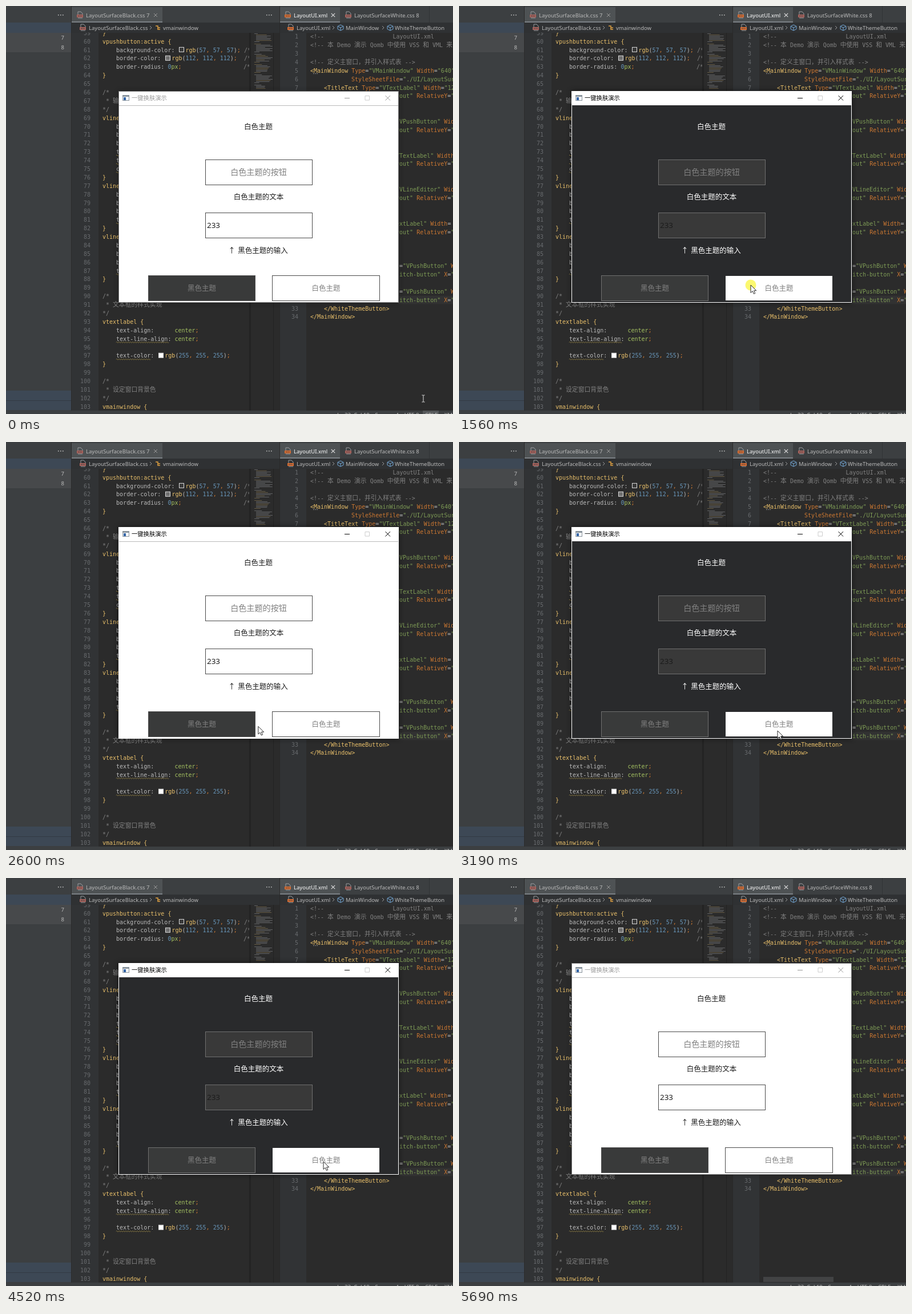
These frames come from a looping animation (783x715 px, 5740 ms). An HTML page:

```html
<!DOCTYPE html>
<html lang="zh">
<head>
<meta charset="utf-8">
<style>
html, body { margin: 0; width: 100%; height: 100%; overflow: hidden; background: #2b2b2b; }
svg { display: block; }
text { white-space: pre; }
.code { font: 10px "DejaVu Sans Mono", "Noto Sans CJK SC", "Noto Sans CJK", monospace; fill: #bababa; }
.ui { font: 9.5px "Noto Sans", "Open Sans", sans-serif; fill: #bbbbbb; }
.cjk { font-family: "Noto Sans CJK SC", "Noto Sans CJK", sans-serif; text-anchor: middle; }
</style>
</head>
<body>
<svg id="stage" width="783" height="715" viewBox="0 0 783 715"></svg>
<script>
const stage = document.getElementById('stage');
const LOOP = 5740, PITCH = 14.885;

const rect = (x, y, w, h, fill, more = '') =>
  `<rect x="${x}" y="${y}" width="${w}" height="${h}" fill="${fill}" ${more}/>`;
const path = (d, stroke, more = '') => `<path d="${d}" fill="none" stroke="${stroke}" ${more}/>`;
const text = (x, y, s, cls, more = '') => `<text x="${x}" y="${y}" class="${cls}" ${more}>${s}</text>`;
const esc = s => s.replace(/&/g, '&amp;').replace(/</g, '&lt;').replace(/>/g, '&gt;');
const ink = (s, color, more = '') => `<tspan fill="${color}" ${more}>${esc(s)}</tspan>`;
const enlargeCjk = s => s.replace(/[\u2e80-\u9fff\uff00-\uffef]+/g, m => `<tspan font-size="10.8">${m}</tspan>`);

// Syntax colouring: each capture group of the pattern has its colour.
function paint(line, pattern, colors) {
  let out = '', end = 0;
  for (const m of line.matchAll(pattern)) {
    out += esc(line.slice(end, m.index));
    const group = m.slice(1).findIndex(g => g !== undefined);
    const swatch = m[0][0] === '@';
    out += ink(swatch ? m[0].slice(1) : m[0], colors[group], swatch ? 'dx="13"' : '');
    end = m.index + m[0].length;
  }
  return out + esc(line.slice(end));
}
const css = s => /^( \*|\/\*|\*\/)/.test(s) ? enlargeCjk(ink(s, '#808080')) :
  paint(s, /(\/\*)|(@rgb|^v[\w:]+|[{}])|(\d+)|(center|px)|([;,])/g,
    ['#808080', '#e8bf6a', '#6897bb', '#a5c261', '#cc7832']);
const xml = s => s.startsWith('<!--') ? enlargeCjk(ink(s, '#808080')) :
  paint(s, /(^[\w-]+"|"[^"]*"?)|(<\/?\w+|>)|(\w+(?==))/g, ['#7d9a55', '#e8bf6a', '#cc7832']);

const leftY = n => 62 + (n - 60) * PITCH;
const rightY = n => 53.5 + (n - 1) * PITCH;

const cssLines = {
  59: '}', 60: 'vpushbutton:active {',
  61: '    background-color: @rgb(57, 57, 57); /*',
  62: '    border-color: @rgb(112, 112, 112);  /*',
  63: '    border-radius: 0px;                  /*',
  64: '}', 66: '/*', 67: ' * 输入框', 68: '*/', 69: 'vlineeditor {',
  76: '}', 77: 'vlineeditor {', 82: '}', 83: 'vlineeditor {', 88: '}',
  90: '/*', 91: ' * 文本框的样式实现', 92: '*/', 93: 'vtextlabel {',
  94: '    text-align:      center;', 95: '    text-line-align: center;',
  97: '    text-color: @rgb(255, 255, 255);', 98: '}',
  100: '/*', 101: ' * 设定窗口背景色', 102: '*/', 103: 'vmainwindow {'
};
[[70, 'bbbttc'], [78, 'bbbt'], [84, 'bbbt']].forEach(([n, initials]) =>
  [...initials].forEach((c, i) => { cssLines[n + i] = '    ' + c; }));

const layout = 'yout" RelativeY="', push = '"VPushButton" Width=';
const xmlLines = [
  [1, 533, '<!--' + ' '.repeat(20) + 'LayoutUI.xml'],
  [2, 533, '<!-- 本 Demo 演示 Qomb 中使用 VSS 和 VML 来'],
  [4, 533, '<!-- 定义主窗口，并引入样式表 -->'],
  [5, 533, '<MainWindow Type="VMainWindow" Width="640"'],
  [6, 605, 'StyleSheetFile="./UI/LayoutSurface'],
  [7, 557, '<TitleText Type="VTextLabel" Width="12'],
  [11, 683, push], [15, 677, '"VTextLabel" Width='],
  [19, 683, '"VLineEditor" Width='], [23, 665, '"VTextLabel" Width='],
  ...[8, 12, 16, 20, 24].map(n => [n, 683, layout]),
  [28, 689, '=' + push], [29, 689, 'itch-button" X="6'],
  [31, 689, '=' + push], [32, 689, 'itch-button" X="3'],
  [33, 557, '</WhiteThemeButton>'], [34, 533, '</MainWindow>']
];

const wave = (n, chars) => {
  let d = `M193 ${leftY(n) + 6.5}`;
  for (let i = 0; i < chars * 1.5; i++) d += 'q1-2 2 0t2 0';
  return path(d, '#a8924a', 'stroke-width=".8"');
};
const fileIcon = (x, y, color) =>
  path(`M${x + 2} ${y + 5}v-5h5l3 3v2`, '#9a9da0') + rect(x, y + 5, 11, 5, color) +
  path(`M${x + 2} ${y + 7.5}h7`, '#3c3f41', 'stroke-dasharray="2 .7"') +
  path(`M${x + 2} ${y + 11}h8`, '#9a9da0');
const dots = (x, y) => [0, 4, 8].map(d => rect(x + d, y, 1.6, 1.6, '#bbb')).join('');
const cross = (x, y, r, color, w = 1) =>
  path(`M${x - r} ${y - r}l${2 * r} ${2 * r}m0 ${-2 * r}l${-2 * r} ${2 * r}`, color, `stroke-width="${w}"`);
const chevron = x => path(`M${x} 35l3 3-3 3`, '#9a9a9a');
const cube = x => path(`M${x} 35.5l5-2.5 5 2.5v5l-5 2.5-5-2.5zl5 2.5 5-2.5m-5 2.5v5`, '#75a9d8');

function minimap() {
  let seed = 7, out = '';
  const rnd = () => (seed = seed * 16807 % 2147483647) / 2147483647;
  for (let y = 48; y < 146; y += 2) {
    const row = (y - 48) / 2 % 9;
    if (row === 8) continue;
    const edge = row === 0 || row === 7;
    out += rect(edge ? 435 : 438, y, edge ? 6 + rnd() * 8 : 14 + rnd() * 16, 1,
      rnd() < .3 ? '#8a7a55' : '#85888a', 'opacity=".6"');
  }
  return out;
}

function editor() {
  let s = rect(0, 0, 783, 715, '#2b2b2b') +
    rect(115, 30, 47, 680, '#313335') + rect(480, 30, 46, 680, '#313335');
  s += rect(687, rightY(32) - 7, 96, 14.5, '#323232');
  for (let n = 59; n <= 103; n++) {
    s += text(148, leftY(n) + 3.7, n, 'code', 'text-anchor="end" style="fill:#686b6e"');
    if (cssLines[n]) s += text(169, leftY(n) + 3.7, css(cssLines[n]), 'code');
  }
  for (let n = 1; n <= 34; n++)
    s += text(512, rightY(n) + 3.7, n, 'code', 'text-anchor="end" style="fill:#686b6e"');
  for (const [n, x, line] of xmlLines) s += text(x, rightY(n) + 3.7, xml(line), 'code');
  for (const [n, col, color] of [[61, 22, '#393939'], [62, 18, '#707070'], [97, 16, '#fff']])
    s += rect(171.5 + col * 6, leftY(n) - 4.5, 8, 8, color, 'stroke="#ddd"');
  for (const [n, len] of [[73, 1], [74, 1], [75, 1], [81, 1], [87, 1], [95, 15], [97, 10]]) s += wave(n, len);
  s += path('M538 118.5h8', '#aaa', 'stroke-dasharray="1.5 1.7"');
  s += rect(426, 47, 3, 662, '#232323') + rect(468, 47, 1, 662, '#222') + rect(479, 0, 1, 709, '#292929') + minimap();

  // Breadcrumbs and tabs
  s += rect(115, 29, 364, 18, '#2f3133') + rect(480, 29, 303, 18, '#2f3133') +
    fileIcon(129, 32, '#a6615b') + text(145, 41.5, 'LayoutSurfaceBlack.css', 'ui') + chevron(252) +
    path('M262 35h4v6h4m-4-3h4', '#e0a042', 'stroke-width="1.5"') + text(275, 41.5, 'vmainwindow', 'ui') +
    fileIcon(493, 32, '#d46b32') + text(509, 41.5, 'LayoutUI.xml', 'ui') + chevron(572) +
    cube(581) + text(595, 41.5, 'MainWindow', 'ui') + chevron(659) + cube(668) + text(681, 41.5, 'WhiteThemeButton', 'ui');
  s += rect(0, 0, 783, 29, '#3c3f41') + rect(115, 2, 159, 27, '#4e5254') + rect(480, 2, 105, 27, '#4e5254') +
    rect(115, 27, 159, 2, '#7b8085') + rect(480, 27, 105, 2, '#7b8085') +
    fileIcon(124, 10, '#a6615b') + text(140, 19.5, 'LayoutSurfaceBlack.css 7', 'ui') + cross(262, 16, 3, '#999') +
    fileIcon(488, 10, '#d46b32') + text(504, 19.5, 'LayoutUI.xml', 'ui', 'style="fill:#fff"') + cross(573, 16, 3.2, '#ddd', 1.2) +
    fileIcon(594, 10, '#a6615b') + text(610, 19.5, 'LayoutSurfaceWhite.css 8', 'ui') +
    rect(479, 0, 1, 29, '#2b2b2b') + rect(741, 0, 1, 29, '#313335') + dots(456, 15);

  // Sidebar and status bar
  s += rect(0, 0, 114, 715, '#3c3f41') + rect(114, 0, 1, 709, '#2b2b2b') + rect(0, 29, 114, 18, '#3d4855') +
    rect(0, 47, 114, 34, '#47494b') + rect(0, 674, 114, 34, '#3d4855') + rect(0, 691, 114, 1, '#323a44') + dots(91, 15) +
    text(102, 59, '7', 'ui', 'text-anchor="end"') + text(102, 76, '8', 'ui', 'text-anchor="end"');
  s += rect(533, 699, 123, 9, '#424344', 'id="scroll"') + rect(0, 709, 783, 6, '#3c3f41') +
    rect(730, 709, 28, 6, '#55585a', 'id="statusHover"') +
    text(580, 720, 'Ln 33, Col 18    Spaces: 4    UTF-8', 'ui') + text(734, 720, 'CRLF', 'ui') + text(768, 720, 'XML', 'ui');
  return s;
}

const box = (x, y, cls, w = 187) => rect(x + .5, y + .5, w, 44, 'none', `class="${cls}"`);
const label = (x, y, size, s, cls) => text(x, y, s, 'cjk ' + cls, `font-size="${size}"`);

function dialog() {
  return rect(197, 149, 491, 371, '#000', 'id="shadow" filter="url(#blur)"') +
    rect(197.5, 149.5, 490, 370, '#fff', 'id="frame"') +
    rect(198, 174, 489, 345, '#fff', 'id="client"') +
    path('M198 174.5h489', '#bbb', 'id="edge"') +
    rect(204.5, 156.5, 11, 9, '#f4f6f8', 'stroke="#8a949c"') + rect(205, 157, 10, 2, '#8a949c') + rect(206, 160, 4, 5, '#3566a8') +
    text(220, 165, '一键换肤演示', 'cjk title', 'font-size="10.3" style="text-anchor:start"') +
    path('M593 161.5h9', '#000', 'class="glyph"') +
    path('M629 157.5h7.5v7.5h-7.5z', '#ccc') +
    `<g class="glyph">${path('M664.5 157l8.5 8.5m0-8.5l-8.5 8.5', 'inherit')}</g>` +
    label(442, 215.5, 12.5, '白色主题', 'label') +
    box(349, 269, 'field') + label(442.5, 296, 14.1, '白色主题的按钮', 'btn') +
    label(442.5, 339, 12.5, '白色主题的文本', 'label') +
    box(349, 362, 'field') +
    text(352, 388.5, '233', '', 'font-size="13.4" font-family="Noto Sans, sans-serif" fill="#1c1c1c"') +
    label(395.5, 432.5, 12.5, '↑', 'label') + label(450, 432.5, 12.5, '黑色主题的输入', 'label') +
    box(249, 472, 'black') + label(343, 498.5, 12.5, '黑色主题', 'btn') +
    box(466, 472, 'white', 188) + label(560.5, 498.5, 12.5, '白色主题', 'btn');
}

stage.innerHTML =
  '<defs><filter id="blur" x="-10%" y="-10%" width="120%" height="120%"><feGaussianBlur stdDeviation="5"/></filter></defs>' +
  editor() + dialog() +
  '<circle id="halo" r="9.5" fill="#fbf870"/>' +
  '<path id="arrow" d="M0 0v13.5l3.2-2.8 2.2 4.8 2.3-1-2.1-4.7h4.2z" fill="#fff" stroke="#111" stroke-width=".9"/>' +
  path('M-2.5-6h2l.5.5.5-.5h2M0-5.5v11M-2.5 6h2l.5-.5.5.5h2', '#e4e4e4', 'id="beam"');

const $ = id => document.getElementById(id);
const attr = (sel, values) => stage.querySelectorAll(sel).forEach(el => {
  for (const k in values) el.setAttribute(k, values[k]);
});
const show = (id, on) => $(id).setAttribute('visibility', on ? 'visible' : 'hidden');

// Pointer stops: arrive, leave, x, y. A press always ends with a theme switch.
const stops = [
  [0, 30, 731, 688], [340, 430, 362, 494], [610, 820, 487, 490], [1090, 1170, 384, 493],
  [1540, 1650, 511, 489], [1890, 2030, 387, 494], [2340, 2420, 538, 499], [2730, 2810, 384, 498],
  [3120, 3280, 558, 506], [3510, 3580, 382, 500], [3750, 3820, 550, 501], [4140, 4210, 384, 499],
  [4510, 4580, 556, 497], [4780, 4840, 392, 497], [4925, 4975, 500, 497], [5310, LOOP, 693, 676]
];
// Press and release times, alternating black and white.
const clicks = [
  [380, 420], [610, 650], [1100, 1160], [1560, 1650], [1900, 2000], [2350, 2410], [2740, 2800],
  [3220, 3270], [3520, 3570], [3760, 3810], [4150, 4200], [4530, 4570], [4785, 4830], [4930, 4970]
];

function pointer(t) {
  const i = stops.findIndex(s => t < s[1]);
  const [arrive, , x, y] = stops[i];
  if (t >= arrive) return [x, y];
  const [, leave, px, py] = stops[i - 1];
  const u = (t - leave) / (arrive - leave), e = u * u * (3 - 2 * u);
  return [px + (x - px) * e, py + (y - py) * e];
}

function theme(dark, active) {
  const back = dark ? '#292a2c' : '#fff';
  attr('#client', { fill: back });
  attr('#edge', { stroke: dark ? back : '#bbb' });
  attr('.label', { fill: dark ? '#fff' : '#1c1c1c' });
  attr('.btn', { fill: '#808080' });
  attr('.field', { fill: dark ? '#393939' : '#fff', stroke: dark ? '#707070' : '#4a4a4a' });
  attr('.black', { fill: '#393a3a', stroke: dark ? '#707070' : '#505050' });
  attr('.white', { fill: '#fff', stroke: dark ? back : '#4a4a4a' });
  attr('.title', { fill: active ? '#000' : '#999' });
  attr('.glyph', { stroke: active ? '#000' : '#999' });
  attr('#frame', { stroke: active ? '#fff' : '#777' });
  attr('#shadow', { opacity: active ? .55 : .3 });
}

function draw(t) {
  const released = clicks.filter(c => t >= c[1]).length;
  theme(released % 2 === 1, t >= clicks[0][0] && t < 5690);
  const [x, y] = pointer(t);
  const inside = x > 198 && x < 687 && y > 150 && y < 520;
  const at = `translate(${x.toFixed(1)} ${y.toFixed(1)})`;
  attr('#arrow, #beam, #halo', { transform: at });
  show('arrow', inside);
  show('beam', !inside && t < 5340);
  show('halo', clicks.some(c => t >= c[0] && t < c[1]));
  show('scroll', t >= 60 && t < 820 || t >= 5100);
  show('statusHover', t < 30);
}

const start = performance.now();
function tick() {
  draw((performance.now() - start) % LOOP);
  requestAnimationFrame(tick);
}
tick();
</script>
</body>
</html>
```
